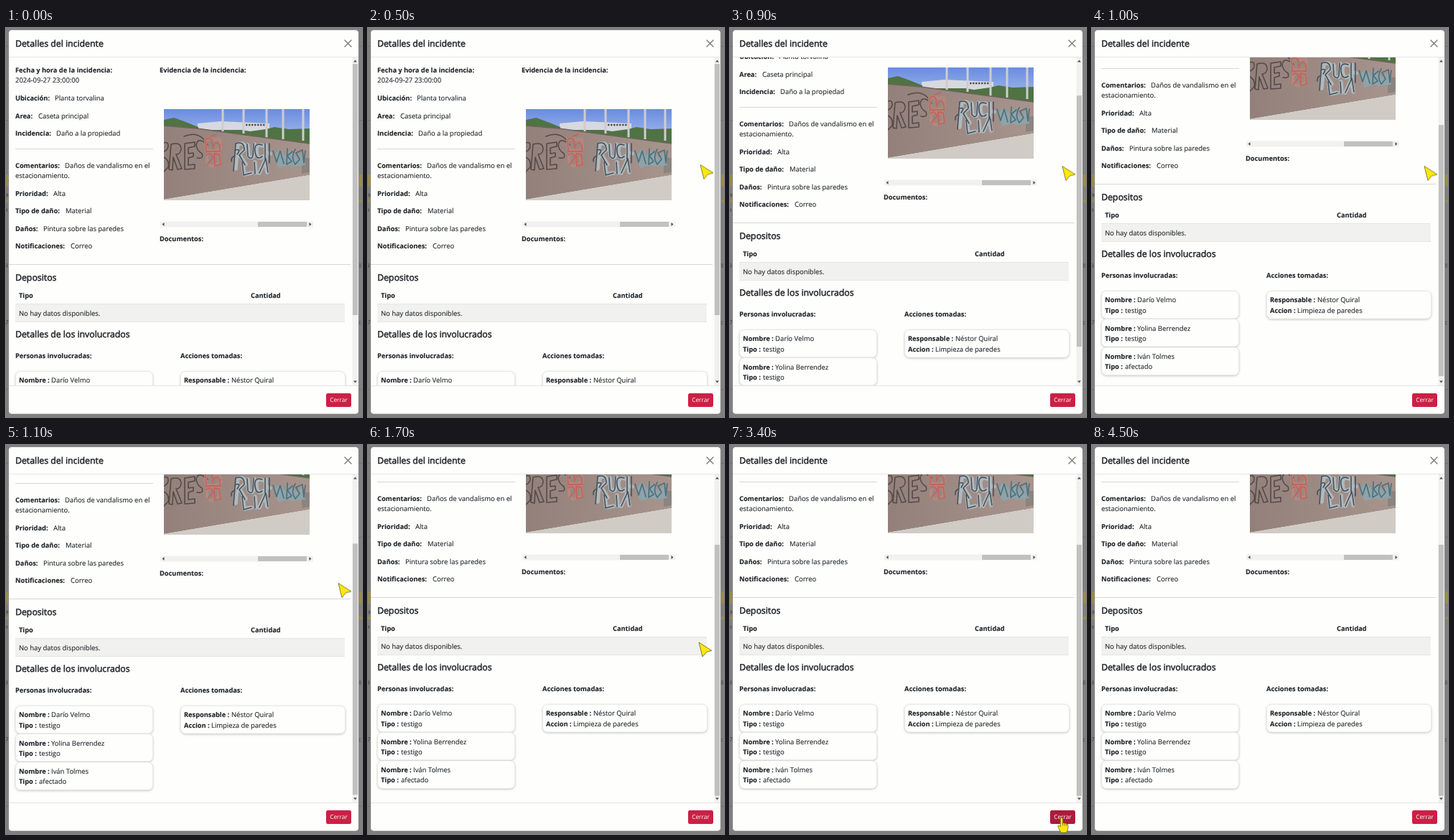
Animation, 496 px wide and 542 px high, one loop 5.4 s. Source, as an HTML page:

```html
<!DOCTYPE html>
<html lang="es">
<head>
<meta charset="utf-8">
<title>Detalles del incidente</title>
<style>
html, body { margin: 0; width: 100%; height: 100%; overflow: hidden; background: #808080; }
svg { display: block; }
text {
  font: 9.45px "Open Sans", "Noto Sans", sans-serif;
  fill: #212529;
  stroke: #212529;
  stroke-width: .12px;
  text-rendering: geometricPrecision;
}
.b { font-size: 9.25px; font-weight: 700; }
.h { font-size: 12.3px; stroke-width: .5px; }
.back text { font-size: 8px; fill: #3c3c3c; stroke: none; }
.rule { stroke: #d6d7d7; stroke-width: 1; }
.light { stroke: #e4e5e5; }
.card { fill: #fefefd; stroke: #e6e6e6; stroke-width: .8; filter: drop-shadow(0 1.5px 1.5px rgba(0, 0, 0, .22)); }
.track { fill: #f1f1f1; }
.thumb { fill: #c1c1c1; }
.tip { fill: #505050; }
.paint { fill: none; stroke-linecap: round; stroke-linejoin: round; }
.pointer { fill: #fbe80c; stroke: #6b6410; stroke-width: .8; stroke-linejoin: round; }

.scroll, .bar, .cursor, .arrow, .hand, .button { animation: 5.4s infinite step-end; }
.scroll { --k: -1; animation-name: scroll; }
.bar { --k: .76; animation-name: scroll; }
.cursor { animation-name: move, fade; }
.arrow { animation-name: arrow; }
.hand { animation-name: hand; }
.button { fill: #cb2045; animation-name: hover; }

@keyframes scroll {
  0% { transform: translateY(0); }
  14.815% { transform: translateY(calc(var(--k) * 4px)); }
  16.667% { transform: translateY(calc(var(--k) * 58px)); }
  18.519% { transform: translateY(calc(var(--k) * 112px)); }
  20.37% { transform: translateY(calc(var(--k) * 115px)); }
  22.222% { transform: translateY(calc(var(--k) * 116.5px)); }
  24.074%, 100% { transform: translateY(calc(var(--k) * 117px)); }
}
@keyframes move {
  0% { transform: translate(463px, 190.5px); }
  16.667% { transform: translate(463px, 192.5px); }
  29.63% { transform: translate(462.5px, 228px); }
  31.481% { transform: translate(461px, 275px); }
  33.333% { transform: translate(460px, 350px); }
  35.185% { transform: translate(459px, 420px); }
  37.037% { transform: translate(458px, 470px); }
  38.889% { transform: translate(457px, 497px); }
  40.741% { transform: translate(456px, 510px); }
  42.593% { transform: translate(455px, 513px); }
  44.444% { transform: translate(455px, 515px); }
  51.852% { transform: translate(455px, 515px); animation-timing-function: steps(5, start); }
  61.111%, 100% { transform: translate(462px, 519px); }
}
@keyframes fade {
  0% { opacity: 0; }
  1.852% { opacity: 0; animation-timing-function: steps(5, start); }
  11.111% { opacity: 1; }
  77.778% { opacity: 1; animation-timing-function: steps(4, start); }
  85.185%, 100% { opacity: 0; }
}
@keyframes arrow { 0% { opacity: 1; } 40.741%, 100% { opacity: 0; } }
@keyframes hand { 0% { opacity: 0; } 40.741%, 100% { opacity: 1; } }
@keyframes hover {
  0% { fill: #cb2045; }
  42.593% { fill: #cb2045; animation-timing-function: steps(3, start); }
  48.148% { fill: #ac1b3b; }
  77.778% { fill: #ac1b3b; animation-timing-function: steps(4, start); }
  85.185%, 100% { fill: #cb2045; }
}
</style>
</head>
<body>
<svg width="496" height="542" viewBox="0 0 496 542">
  <!-- dimmed page -->
  <g class="back">
    <rect width="496" height="542" fill="#808080"/>
    <path d="M0 204h496v17H0zM0 239h496v4H0z" fill="#988d4a"/>
    <path d="M0 25.500h496M0 128.500h496M0 503.500h496" stroke="#707070"/>
    <text x="-1" y="235">a</text><text x="-2" y="256">e</text>
    <text x="-2" y="334">9</text><text x="-1" y="413">7</text>
    <text x="491" y="334">ll</text><text x="491" y="413">c</text>
  </g>

  <rect x="3.500" y="2.500" width="488" height="535.500" rx="4.500" fill="#fefefd" stroke="#727272" stroke-width=".7"/>
  <text class="h" x="13" y="25.500">Detalles del incidente</text>
  <path d="M472 17l9 9m0-9l-9 9" stroke="#808080" stroke-width="1.500" stroke-linecap="round"/>

  <svg y="41" width="496" height="458" viewBox="0 41 496 458">
    <g class="scroll">
      <text class="b" x="13" y="61.500">Fecha y hora de la incidencia:</text>
      <text x="13" y="76">2024-09-27 23:00:00</text>
      <text class="b" x="13" y="101">Ubicación:</text><text x="68" y="101">Planta torvalina</text>
      <text class="b" x="13" y="125.500">Area:</text><text x="45" y="125.500">Caseta principal</text>
      <text class="b" x="13" y="150">Incidencia:</text><text x="70" y="150">Daño a la propiedad</text>
      <path class="rule" d="M13 168.500h192"/>
      <text class="b" x="13" y="194.500">Comentarios:</text><text x="82" y="194.500">Daños de vandalismo en el</text>
      <text x="13" y="209">estacionamiento.</text>
      <text class="b" x="13" y="233.500">Prioridad:</text><text x="66" y="233.500">Alta</text>
      <text class="b" x="13" y="258">Tipo de daño:</text><text x="83" y="258">Material</text>
      <text class="b" x="13" y="282.500">Daños:</text><text x="52" y="282.500">Pintura sobre las paredes</text>
      <text class="b" x="13" y="307">Notificaciones:</text><text x="90" y="307">Correo</text>

      <text class="b" x="214" y="61.500">Evidencia de la incidencia:</text>
      <svg x="220" y="113" width="203" height="127" viewBox="220 113 203 127">
        <linearGradient id="sky" x2="0" y2="1"><stop stop-color="#6a8ce0"/><stop offset="1" stop-color="#adc3ec"/></linearGradient>
        <linearGradient id="wall"><stop stop-color="#93807a"/><stop offset="1" stop-color="#a7948d"/></linearGradient>
        <rect x="220" y="113" width="203" height="50" fill="url(#sky)"/>
        <path d="M267 133l32-3 68 3v20h-100z" fill="#d8d9e0"/>
        <path d="M334 135h28" stroke="#555" stroke-width="2.500" stroke-dasharray="2.500 1.500"/>
        <path d="M220 128l14-3 14 5 20 8v4h60l12 2 22-3 12-3 20 3 29-1v24H220z" fill="#4f7343"/>
        <path d="M302 113v32M331 113v34M363 113v40M386 113v42M414 113v44" stroke="#cfccd0" stroke-width="3"/>
        <path d="M220 136l46 4 157 21v44l-203 34z" fill="url(#wall)"/>
        <path d="M220 136l46 4 157 21" stroke="#6f625d" stroke-width="1.500" fill="none"/>
        <path d="M220 239l203-34v35H220z" fill="#d0cbc5"/>
        <path d="M412 181h11v20l-11 2z" fill="#8b8480"/>
        <g class="paint">
          <path d="M220 160q6-2 6 4t-6 8m0 8q8 4 6 14l-6 6m10-38q14-4 14 7-1 7-7 7l8 20-6 1-6-17-1 18-5-1zm19-1l14-2v6l-9 2v8l7-1v5l-7 2v10l9-1v6l-14 1zm27-2q-9-6-11 4 1 8 8 12 3 8-7 6m-18-30q22-9 33 12" stroke="#544a4a" stroke-width="1.600"/>
          <path d="M278 156q6-4 12 0l8-2 1 14-10 4-10-2zm2 20l16-3 2 15-12 5-6-5z" stroke="#b3877f" stroke-width="4"/>
          <path d="M278 156q4-5 9 0l1 11q4-12 10-4v9h-19zm1 21q8-5 9 4l-7 9m9-15l1 17 8-2-2-14zm-5-24l8-3" stroke="#c4645a" stroke-width="1.800"/>
          <path d="M320 196l3-34q10-4 10 7l-8 7 9 14m3-27l1 16q6 4 7-2l1-15m12 2q-10-4-9 9 2 12 9 6m4-16v20m0-10l6 2m-38 14l2 15 10-2m5-15l1 15m5 0l8-18 3 17" stroke="#aeb9be" stroke-width="5.500"/>
          <path d="M317 199l3-38q12-4 12 9l-7 7 8 14m3-29l1 17q6 6 7-2l1-16m12 2q-12-4-10 10 2 12 10 6m4-18v22m6-22v27m-38-1l2 18 11-3m4-15l1 16m6-1l9-20 3 19m-46-23q-6 2-5 8m6-16q8-2 2 6" stroke="#465059" stroke-width="1.600"/>
          <path d="M374 178l8-8 6 10 8-8 8 10 8-6 4 14-14 2-10-2-12 4z" fill="#8fa3a8" stroke="#8fa3a8" stroke-width="2"/>
          <path d="M372 171l5 16 5-16 5 18m5-21l-1 22 7-4-6-8 7-6m4-3q-7 11 0 21l6-7-5-9 9-4 2 18m2-17l-2 15" stroke="#4b717f" stroke-width="1.700"/>
        </g>
      </svg>
      <rect class="track" x="215" y="269.500" width="213" height="8"/>
      <rect class="thumb" x="351" y="270" width="68" height="7"/>
      <path class="tip" d="M220.500 271v5l-3-2.500zM422.500 271v5l3-2.500z"/>
      <text class="b" x="214" y="296.500">Documentos:</text>

      <path class="rule" d="M4 329.500h476"/>
      <text class="h" x="13" y="351.500">Depositos</text>
      <text class="b" x="18" y="375.500">Tipo</text><text class="b" x="341" y="375.500">Cantidad</text>
      <rect x="13" y="384" width="459" height="25.500" fill="#f1f1ef"/>
      <path class="rule light" d="M13 384.500h459M13 409.500h459"/>
      <text x="18" y="400.500">No hay datos disponibles.</text>

      <text class="h" x="13" y="431">Detalles de los involucrados</text>
      <text class="b" x="13" y="460">Personas involucradas:</text>
      <text class="b" x="243" y="460">Acciones tomadas:</text>

      <rect class="card" x="13.500" y="478.500" width="191" height="38.500" rx="6.500"/>
      <text class="b" x="18" y="494">Nombre :</text><text x="63" y="494">Darío Velmo</text>
      <text class="b" x="18" y="508.500">Tipo :</text><text x="46" y="508.500">testigo</text>
      <rect class="card" x="13.500" y="517.500" width="191" height="38.500" rx="6.500"/>
      <text class="b" x="18" y="533.500">Nombre :</text><text x="63" y="533.500">Yolina Berrendez</text>
      <text class="b" x="18" y="548">Tipo :</text><text x="46" y="548">testigo</text>
      <rect class="card" x="13.500" y="557" width="191" height="38.500" rx="6.500"/>
      <text class="b" x="18" y="572.500">Nombre :</text><text x="63" y="572.500">Iván Tolmes</text>
      <text class="b" x="18" y="587">Tipo :</text><text x="46" y="587">afectado</text>

      <rect class="card" x="243.500" y="478.500" width="229" height="38.500" rx="6.500"/>
      <text class="b" x="248" y="494">Responsable :</text><text x="314" y="494">Néstor Quiral</text>
      <text class="b" x="248" y="508.500">Accion :</text><text x="286" y="508.500">Limpieza de paredes</text>
    </g>
    <rect class="track" x="482.500" y="41" width="8" height="457"/>
    <rect class="thumb bar" x="483" y="50" width="7" height="350"/>
    <path class="tip" d="M484 47.500h5l-2.500-3zM484 491.500h5l-2.500 3z"/>
  </svg>
  <path class="rule light" d="M4 40.500h487M4 498.500h487"/>

  <rect class="button" x="446" y="509" width="35" height="19" rx="2.500"/>
  <text x="463.500" y="521.300" text-anchor="middle" style="font-size:8.4px;fill:#fff;stroke:none">Cerrar</text>

  <g class="cursor">
    <path class="pointer arrow" d="M0 0L18 11.500 10.500 13.500 5 20z"/>
    <g class="pointer hand">
      <path d="M-1.700 1.500Q0-1 1.700 1.500V8q1.700-1.300 2.600.5 1.700-1 2.500.6 2-.6 2.200 1.400v5L7 21H-1l-4-8q-.5-2.500 1.500-2l1.800 2z"/>
      <path d="M1.700 8v3.500M4.300 8.500v3M6.800 9.200v2.500" fill="none"/>
    </g>
  </g>
</svg>
</body>
</html>
```
